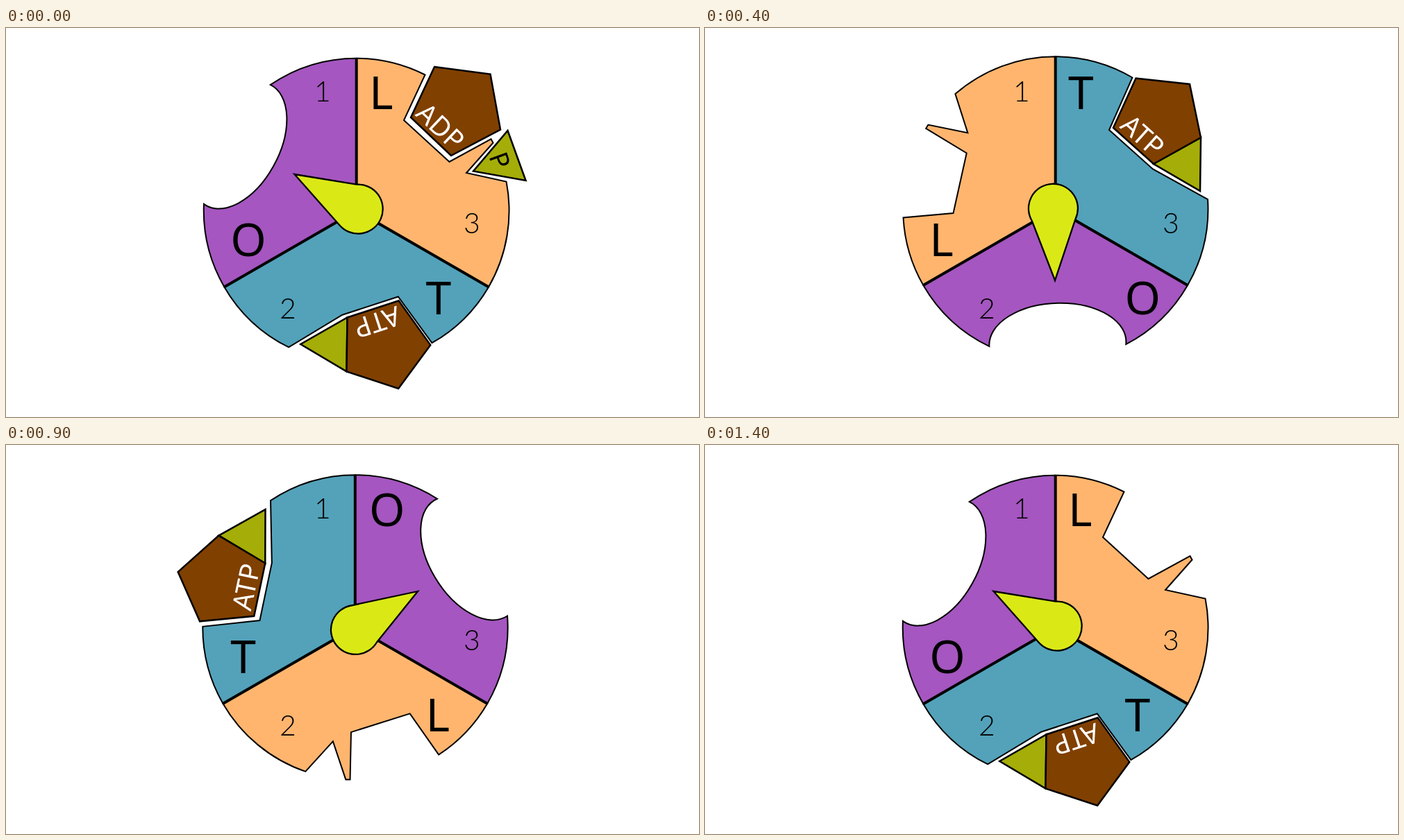
An HTML page for the animation above (1.5 s loop, 998 by 561 pixels).

```html
<!DOCTYPE html>
<html lang="en">
<head>
<meta charset="utf-8">
<title>Rotary enzyme cycle</title>
<style>
  html, body { margin: 0; width: 100%; height: 100%; overflow: hidden; background: #fff; }
  svg { display: block; width: 100vw; height: 100vh; }
  text { font-family: "Noto Sans", "Open Sans", sans-serif; }
  .num { font: 300 41px Lato, sans-serif; text-anchor: middle; }
  .letter { font-size: 66px; }
  .tag { font-size: 39px; text-anchor: middle; fill: #fff; }
  .small { font-size: 37px; text-anchor: middle; }
  .cell { stroke: #000; stroke-width: 2; }
  .spoke { stroke: #000; stroke-width: 4; }
  .drop { fill: #dae916; stroke: #000; stroke-width: 2.3; }
  .body { fill: #804000; stroke: #000; stroke-width: 2.5; }
  .phos { fill: #a5ad08; stroke: #000; stroke-width: 2.5; }
</style>
</head>
<body>
<svg id="stage" viewBox="0 0 998 561" xmlns="http://www.w3.org/2000/svg"></svg>
<script>
const R = 219.8, STEP = 100, STEPS = 15;

// All shapes are drawn for site 3; the other sites are turned copies.
const TURN = { 1: -120, 2: 120, 3: 0 };

const CELLS = {
  O: { fill: '#a556c0', start: '118.2 -185.5', notch: 'A98.6 58 -122 1 0 219.2 -16.5' },
  T: { fill: '#53a2ba', start: '110.8 -189.5', notch: 'L77.3 -114 140.3 -57.5 219.3 -14' },
  L: { fill: '#ffb56e', start: '98.8 -196',
       notch: 'L68.3 -130.5 133.8 -70.5 193.8 -103.5 196.8 -98 158.3 -54.5 215.8 -42' }
};

const LETTER_AT = { 1: [323.3, 329], 2: [604.4, 413], 3: [523, 117] };
const NUMBERS = [[1, 456, 105.5], [2, 406, 418.5], [3, 671, 296]];

// out: site that lets ATP go, mid: site that binds tightly, next: site that fills
const PHASES = [
  { out: 2, mid: 3, next: 1, hub: [504.7, 261], exit: [256.5, 39.5],
    drop: 'M504 364L471 278.5A35.5 35.5 0 1 1 533.5 275.5Z' },
  { out: 3, mid: 1, next: 2, hub: [502.8, 263], exit: [235, -48],
    drop: 'M593 211L497 231.5A35.5 35.5 0 1 0 534 284.5Z' },
  { out: 1, mid: 2, next: 3, hub: [504.7, 263.5], exit: [-210, -67],
    drop: 'M415.5 211L505 225.7A35.5 35.5 0 1 1 480 284Z' }
];

const ATP_HUB = { 1: [500.2, 260.4], 2: [505.9, 262.6], 3: [504.7, 261] };
const ADP_HUB = { 1: [505.3, 264.2], 2: [505.7, 261], 3: [504.7, 261] };

const place = ([x, y], turn = 0) => `translate(${x} ${y}) rotate(${turn})`;

function cell(name, site) {
  const { fill, start, notch } = CELLS[name];
  const arc = `A${R} ${R} 0 0 1 `;
  const end = `${R * Math.cos(Math.PI / 6)} ${R / 2}`;
  return `<path class="cell" fill="${fill}" transform="rotate(${TURN[site]})"
    d="M0 0V${-R}${arc}${start}${notch}${arc}${end}Z"/>`;
}

function letter(name, site) {
  const [x, y] = LETTER_AT[site];
  return `<text class="letter" x="${x}" y="${y}">${name}</text>`;
}

function wheel({ out, mid, next, hub, drop }) {
  const parts = [['O', out], ['T', mid], ['L', next]];
  const spokes = [0, 120, 240].map(a =>
    `<line class="spoke" y2="${-R}" transform="rotate(${a})"/>`).join('');
  return `<g transform="${place(hub)}">${parts.map(p => cell(...p)).join('')}${spokes}</g>` +
    parts.map(p => letter(...p)).join('') + `<path class="drop" d="${drop}"/>`;
}

const label = (cls, str, x, y, turn, dy = 0) =>
  `<text class="${cls}" transform="${place([x, y], turn)}" y="${dy}">${str}</text>`;

const ATP = `<polygon class="phos" points="209.3,-103 208.3,-26 141.3,-65"/>
  <polygon class="body" points="115.8,-188.5 193.3,-180 209.3,-103 141.3,-65 83.3,-117"/>` +
  label('tag', 'ATP', 116.3, -95.5, 41.9);

const ADP = `<polygon class="body" points="112.3,-205 192.8,-194.5 207.3,-114.5 136.3,-77 78.3,-132"/>
  <polygon class="phos" points="217.8,-113 243.8,-41 168.3,-54.5"/>` +
  label('tag', 'ADP', 111.4, -108.9, 43.5) + label('small', 'P', 206.5, -70, 70, 13.2);

const stage = document.getElementById('stage');
stage.innerHTML = PHASES.map(p => `<g class="wheel">${wheel(p)}</g>`).join('') +
  NUMBERS.map(([n, x, y]) => `<text class="num" x="${x}" y="${y}">${n}</text>`).join('') +
  `<g id="adp">${ADP}</g><g id="atp">${ATP}</g>`;

const wheels = [...stage.querySelectorAll('.wheel')];
const adp = document.getElementById('adp');
const atp = document.getElementById('atp');

function show(el, on) {
  el.style.display = on ? '' : 'none';
}

function put(el, hubs, site, [dx, dy] = [0, 0]) {
  show(el, site);
  if (!site) return;
  const [x, y] = hubs[site];
  el.setAttribute('transform', place([x + dx, y + dy], TURN[site]));
}

function draw(ms) {
  const s = (Math.floor(ms / STEP) + STEPS - 1) % STEPS;
  const k = Math.floor(s / 5), beat = s % 5;
  const { out, mid, next, exit } = PHASES[k];
  wheels.forEach((w, i) => show(w, i === k));
  // beats: wheel turned, ATP leaves, ATP gone, new ATP formed, next ADP + P bound
  put(atp, ATP_HUB, [out, out, 0, mid, mid][beat], beat === 1 ? exit : undefined);
  put(adp, ADP_HUB, [mid, mid, mid, 0, next][beat]);
}

function tick() {
  draw(performance.now() % (STEP * STEPS));
  requestAnimationFrame(tick);
}
tick();
</script>
</body>
</html>
```
